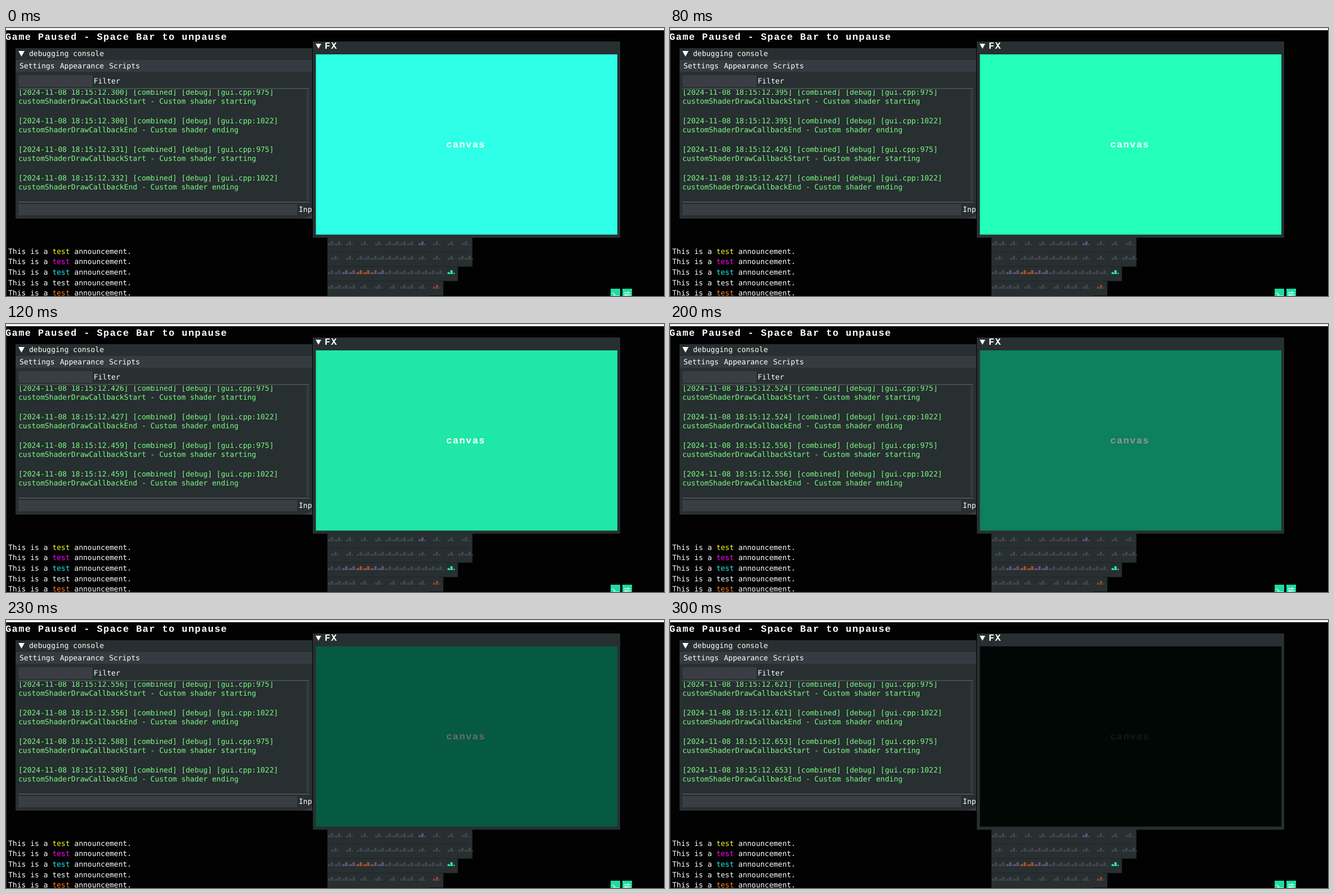
An HTML page for the animation above (400 ms loop, 1171 by 478 pixels).

```html
<!DOCTYPE html>
<html lang="en">
<head>
<meta charset="utf-8">
<title>Debugging console</title>
<style>
html, body { margin: 0; width: 100%; height: 100%; overflow: hidden; background: #020202; }
svg { display: block; width: 1171px; height: 478px; }
text { white-space: pre; text-rendering: geometricPrecision; fill: #fff; }
.mono { font: 13.02px "DejaVu Sans Mono", monospace; }
.log { fill: #7cf884; }
.slab { font: bold 17px "Liberation Mono", monospace; letter-spacing: 1.42px; }
</style>
</head>
<body>
<svg id="stage" viewBox="0 0 1171 478">
  <defs>
    <clipPath id="consoleClip"><rect x="17" y="36" width="528" height="304"/></clipPath>
    <clipPath id="logClip"><rect x="17" y="110" width="517" height="198"/></clipPath>
  </defs>
</svg>
<script>
const stage = document.getElementById("stage");

function add(tag, attrs, parent = stage) {
  const el = document.createElementNS("http://www.w3.org/2000/svg", tag);
  for (const key in attrs) el.setAttribute(key, attrs[key]);
  parent.appendChild(el);
  return el;
}
const rect = (x, y, width, height, fill, parent) =>
  add("rect", { x, y, width, height, fill }, parent);
const path = (d, attrs, parent) => add("path", { d, ...attrs }, parent);
function label(x, y, str, cls = "mono", parent) {
  const el = add("text", { x, y, class: cls }, parent);
  el.textContent = str;
  return el;
}

const PANEL = "#272f30", BAR = "#343b41", FIELD = "#3a3d44", RULE = "#6a6e6e";

// Page edges and heading
rect(0, 0, 1171, 478, "#020202");
rect(0, 4, 1, 474, "#3c3c3c");
rect(0, 0, 1171, 4, "#eeeeee");
label(-1, 21, "Game Paused - Space Bar to unpause", "slab");

// Console window
const win = add("g", { "clip-path": "url(#consoleClip)" });
rect(17, 36, 528, 304, PANEL, win);
rect(17, 57, 528, 21, BAR, win);
rect(22, 84, 132, 21, FIELD, win);
rect(22, 314, 496, 20, FIELD, win);
rect(534, 110, 6, 198, "#34393d", win);
rect(22, 107.5, 518, 1, RULE, win);
rect(22, 310, 518, 1, RULE, win);
path("M528 340L545 334V340Z", { fill: FIELD }, win);
path("M22 41H33L27.5 51Z", { fill: "#fff" }, win);
label(41, 50, "debugging console", "mono", win);
label(24, 72, "Settings", "mono", win);
label(96, 72, "Appearance", "mono", win);
label(183.5, 72, "Scripts", "mono", win);
label(156, 98.5, "Filter", "mono", win);
label(521, 328, "Input", "mono", win);

const logs = add("g", { "clip-path": "url(#logClip)" });
const stamps = [0, 1, 2, 3].map(i => {
  const y = 119 + i * 51;
  const call = i % 2 ? "End - Custom shader ending" : "Start - Custom shader starting";
  label(22, y + 16, "customShaderDrawCallback" + call, "mono log", logs);
  return label(22, y, "", "mono log", logs);
});

// Announcements
["#ffff20", "#ff00ff", "#20eeee", "#ffffff", "#ff7a18"].forEach((color, i) => {
  const line = label(4, 402.5 + i * 18.7, "This is a ");
  const word = add("tspan", {}, line);
  word.textContent = "test";
  word.style.fill = color;
  line.append(" announcement.");
});

// Stepped map: each tile holds one centred mark (lower case) or a pair (upper case)
const TILE = 25.8;
const tints = { d: "#42474b", p: "#63547c", o: "#a3532c", c: "#2de8ac", r: "#8c4430" };
["DdddDDpddd", "ddDDDDdddD", "DPOPDDDDc", "DDdddDdr"].forEach((row, i) => {
  const top = 374 + i * TILE;
  rect(572, top, row.length * TILE, TILE, PANEL);
  [...row].forEach((kind, col) => {
    const fill = tints[kind.toLowerCase()];
    const offsets = kind === kind.toLowerCase() ? [TILE / 4] : [0, TILE / 2];
    for (const dx of offsets) {
      const x = 573 + col * TILE + dx, y = top + 6.5;
      path(`M${x} ${y + 3.5}h4v3.5h-4zM${x + 5} ${y}h4v7h-4zM${x + 10.5} ${y + 4.5}h2v2.5h-2z`, { fill });
    }
  });
});
rect(572, 374 + 4 * TILE, 7 * TILE, 2, PANEL);

// FX window
rect(546, 24, 547, 350, PANEL);
path("M551 28H561L556 37Z", { fill: "#fff" });
label(567, 37, "FX", "slab");
const canvas = rect(551.5, 47, 536.5, 321.5, "#000");
const canvasText = label(783.5, 212.5, "canvas", "slab");

// Corner buttons
const icon = { fill: "none", stroke: "#e4fff5", "stroke-width": 1.3 };
rect(1076, 465, 17, 13, "#1fdca2");
rect(1097, 465, 17, 13, "#1fdca2");
path("M1079 472L1084 476L1081 479M1086 478H1090", icon);
path("M1100 472H1111M1100 476H1111M1107 470V474M1103 474V478", icon);

const LOOP = 400;
const PASS_MS = 30;
const changes = [0, 30, 80, 120, 160, 200, 230, 270, 300];

// Logged clock: passes slow down slightly after the fourth
const passClock = n => 426.98 + (n - 4) * (n < 4 ? 31.74 : 32.36);
const CALLBACK_MS = 0.25;

function draw(time) {
  const t = time % LOOP;
  const pass = Math.round(changes.findLast(c => c <= t) / PASS_MS);
  stamps.forEach((el, i) => {
    const isEnd = i % 2;
    const ms = Math.floor(passClock(pass + (i >> 1)) + isEnd * CALLBACK_MS);
    el.textContent = `[2024-11-08 18:15:12.${ms}] [combined] [debug] [gui.cpp:${isEnd ? 1022 : 975}]`;
  });

  // The canvas light eases out to black; bright channels clip
  const glow = 230 * (1 - (pass / 10.2) ** 1.35);
  const red = Math.max(0, glow * 0.24 - 9);
  canvas.setAttribute("fill", `rgb(${red}, ${Math.min(255, glow * 1.4)}, ${glow})`);
  const gray = Math.min(255, 14 + glow * 1.46);
  canvasText.style.fill = `rgb(${gray}, ${gray}, ${gray})`;
}

const start = performance.now();
function tick() {
  draw(performance.now() - start);
  requestAnimationFrame(tick);
}
tick();
</script>
</body>
</html>
```
